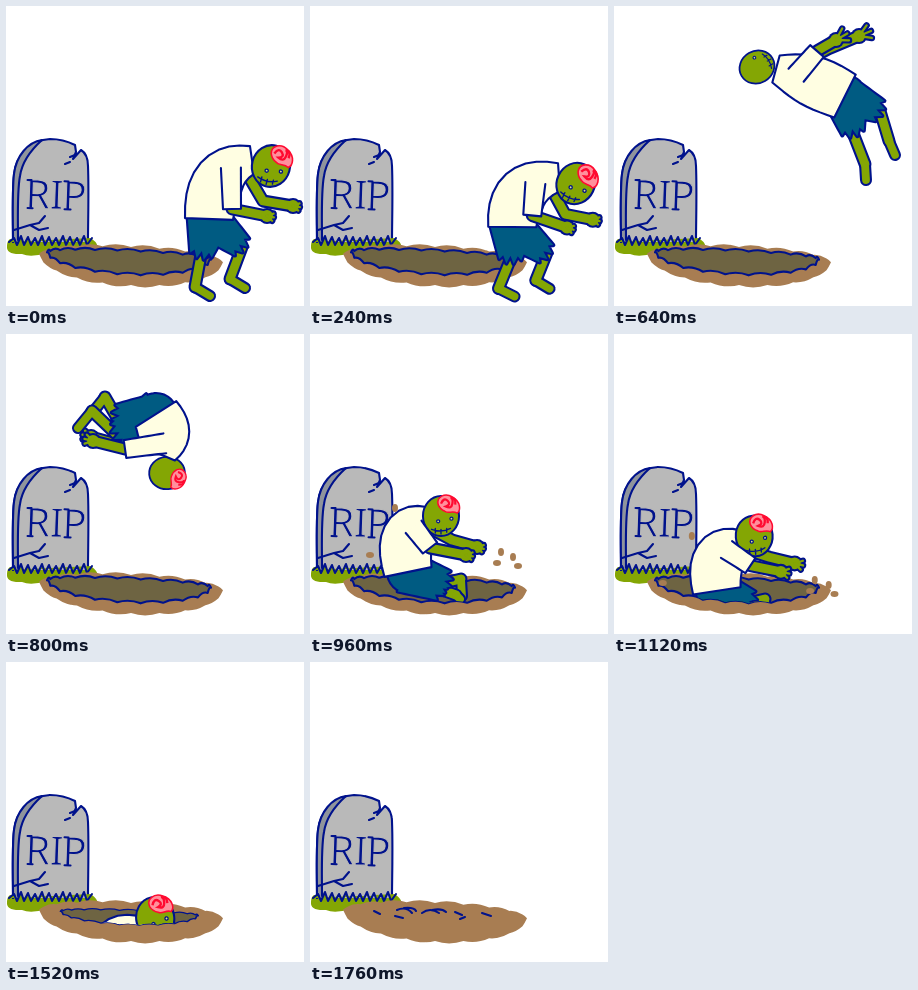
These frames come from a looping animation (298x300 px, 2080 ms). An HTML page:

```html
<!DOCTYPE html>
<html lang="en">
<head>
<meta charset="utf-8">
<title>Back to the grave</title>
<style>
html, body { margin: 0; width: 100%; height: 100%; overflow: hidden; background: #fff; }
svg { display: block; width: 100vw; height: 100vh; }
.ink { stroke: #00128c; stroke-width: 2.1; stroke-linejoin: round; stroke-linecap: round; }
.line { fill: none; }
text { font: 300 40px "Noto Sans", sans-serif; fill: #00128c; stroke: #b9b9b9; stroke-width: 1.1; }
</style>
</head>
<body>
<svg viewBox="0 0 298 300">
  <defs><clipPath id="pit"><path id="pitShape"/></clipPath></defs>
  <path fill="#84a604" d="M4 233L86 233Q93 238 91 243Q84 250 70 246Q55 251 40 247Q25 252 16 248Q0 249 1 240Q1 235 4 233Z"/>
  <path class="ink" fill="#b9b9b9" d="M7 236C7 215 6 185 8 168C10 150 24 134 44 133C55 133 63 136 69 139L70 146 67 153 75 144C80 147 82 152 82 160C83 185 82 215 82 236"/>
  <path class="ink" fill="#8f949c" d="M7 236C7 215 6 185 8 168C10 150 22 136 36 134C26 143 16 156 14 170C11 185 12 210 12 234"/>
  <path class="ink line" d="M64 151l5-2M59 158l5-2M8 224L24 219 33 217 39 210M24 219L33 224 42 222"/>
  <g transform="rotate(2 50 190)">
    <text y="203"><tspan x="19.5">R</tspan><tspan x="44">I</tspan><tspan x="56.5">P</tspan></text>
    <path class="ink line" d="M22 203h5M59 203h6M21 175h4M58 175h4"/>
  </g>
  <path id="grass" class="ink" fill="#84a604"/>
  <path id="mound" fill="#a87d52"/>
  <path id="hole" class="ink" fill="#6e6442"/>
  <path id="marks" class="ink line" d="M64 249l6 3M85 254l8 2M87 248q9-4 15 3M94 246q10-1 12 3M112 251q8-6 17 0M122 248q10-2 14 2M145 250l7 3M150 257l5-2M172 251l9 3"/>
  <g id="zombie"></g>
  <g id="dirt" fill="#a87d52"></g>
</svg>
<script>
const $ = id => document.getElementById(id);
const STEP = 80, LOOP = 2080, LAST = 22;
const INK = '#00128c', SKIN = '#84a604', SHIRT = '#fffee2', CLOTH = '#005b82';

// spine: hip, bend, neck; arms: elbow, hand; legs: hem, ankle, toe;
// face: head radius, tilt, how far the fingers are spread.
const stand = {
  view: 'front', spine: [203, 213, 205, 160, 246, 154], head: [265, 160], face: [20, 15, 0],
  arm: [226, 203, 261, 210], farArm: [257, 195, 287, 200],
  leg: [195, 249, 189, 281, 204, 290], farLeg: [236, 241, 224, 273, 239, 282]
};
const crouch = {
  view: 'front', spine: [200, 245, 196, 218, 258, 223], head: [268, 230], face: [20, 55, 0],
  arm: [211, 229, 245, 256], farArm: [250, 248, 270, 255],
  leg: [216, 268, 187, 287, 206, 292], farLeg: [238, 268, 231, 279, 241, 285]
};
const fly = {
  view: 'side', spine: [231, 90, 195, 72, 162, 63], head: [143, 61], face: [17, -120, 1],
  arm: [203, 45, 222, 34], farArm: [214, 43, 245, 30],
  leg: [239, 127, 251, 158, 252, 174], farLeg: [266, 105, 275, 135, 281, 149]
};
const tuck = {
  view: 'back', spine: [150, 80, 164, 102, 156, 121], head: [161, 139], face: [17, 85, 0.3],
  arm: [119, 115, 87, 107], farArm: [118, 112, 85, 103],
  leg: [110, 100, 86, 77, 72, 94], farLeg: [110, 82, 99, 63, 87, 78]
};
const sit = {
  view: 'front', spine: [98, 238, 88, 190, 118, 187], head: [131, 182], face: [19, 0, 0],
  arm: [120, 214, 156, 221], farArm: [142, 206, 167, 213],
  leg: [132, 256, 146, 261, 150, 265], farLeg: [138, 248, 151, 245, 152, 262]
};
const sink = {
  view: 'front', spine: [110, 285, 108, 246, 144, 246], head: [154, 232], face: [20, -12, 0.7],
  arm: [161, 258, 183, 263], farArm: [176, 249, 201, 254],
  leg: [132, 306, 146, 311, 150, 315], farLeg: [138, 298, 151, 295, 152, 312]
};

const lerp = (a, b, k) => a + (b - a) * k;
const pairs = v => Array.from({ length: v.length / 2 }, (_, i) => [v[2 * i], v[2 * i + 1]]);

function mapPose(pose, fn) {
  return Object.fromEntries(Object.entries(pose).map(([k, v]) => [k, k === 'view' ? v : fn(v, k)]));
}
const mix = (a, b, k) => mapPose(a, (v, key) => v.map((n, i) => lerp(n, b[key][i], k)));

// Turn a pose about its hip, then shift it.
function spin(pose, deg, dx, dy) {
  const a = deg * Math.PI / 180, c = Math.cos(a), s = Math.sin(a), [hx, hy] = pose.spine;
  return mapPose(pose, (v, key) => key === 'face' ? [v[0], v[1] + deg, v[2]] :
    pairs(v).flatMap(([x, y]) => [
      hx + dx + (x - hx) * c - (y - hy) * s,
      hy + dy + (x - hx) * s + (y - hy) * c
    ]));
}

const keys = [
  [0, stand], [2, stand], [6, crouch],
  [7, spin(fly, 45, -3, 12)], [8, fly],
  [9, spin(tuck, 50, 43, 0)], [10, tuck],
  [11, spin(sit, 50, -14, -75)], [12, sit],
  [17, sink], [LAST, spin(sink, 0, -12, 60)]
];

function poseAt(f) {
  const i = Math.max(1, keys.findIndex(k => k[0] >= f));
  const [t0, a] = keys[i - 1], [t1, b] = keys[i];
  return f === t1 ? b : mix(a, b, (f - t0) / (t1 - t0));
}

const along = (a, c, b, t) => [0, 1].map(j => lerp(lerp(a[j], c[j], t), lerp(c[j], b[j], t), t));

// Tapered band along a curve; the far end may be torn into teeth.
function band(a, c, b, r0, r1, bulge = 0, teeth = 0) {
  const left = [], right = [], N = 10;
  let dir;
  for (let i = 0; i <= N; i++) {
    const t = i / N, p = along(a, c, b, t);
    const d = [0, 1].map(j => lerp(c[j] - a[j], b[j] - c[j], t));
    const len = Math.hypot(...d) || 1, r = lerp(r0, r1, t) + bulge * Math.sin(Math.PI * t);
    dir = [d[0] / len, d[1] / len];
    left.push([p[0] + dir[1] * r, p[1] - dir[0] * r]);
    right.unshift([p[0] - dir[1] * r, p[1] + dir[0] * r]);
  }
  const torn = [];
  for (let i = 1; teeth && i < 6; i++) {
    const push = i % 2 ? -teeth : teeth;
    torn.push([0, 1].map(j => lerp(left[N][j], right[0][j], i / 6) + dir[j] * push));
  }
  return 'M' + [...left, ...torn, ...right].join('L');
}
const mid = (a, b) => [(a[0] + b[0]) / 2, (a[1] + b[1]) / 2];
const straight = (a, b, ...rest) => band(a, mid(a, b), b, ...rest);

const shape = (d, fill) => `<path class="ink" fill="${fill}" d="${d}"/>`;
// Several shapes joined under one outline.
const union = (d, fill) => `<path class="ink" d="${d}" style="stroke-width:4.2"/><path fill="${fill}" d="${d}"/>`;

// Limbs are round strokes: all outlines first, then the skin.
function limb(strokes) {
  const pass = (colour, inset) => strokes.map(([pts, w]) =>
    `<path d="M${pts.join('L')}" fill="none" stroke="${colour}" stroke-width="${w - inset}" stroke-linecap="round" stroke-linejoin="round"/>`).join('');
  return pass(INK, 0) + pass(SKIN, 4.2);
}

function arm(from, [elbow, hand], spread) {
  const aim = Math.atan2(hand[1] - elbow[1], hand[0] - elbow[0]);
  const strokes = [[[from, elbow, hand], 13], [[hand, [hand[0] + 0.1, hand[1]]], 16]];
  for (let i = -1; i <= 1; i++) {
    const a = aim + i * 0.55, reach = 7 + 6 * spread;
    strokes.push([[hand, [hand[0] + Math.cos(a) * reach, hand[1] + Math.sin(a) * reach]], 6.5]);
  }
  return limb(strokes);
}

const leg = ([hem, ankle, toe]) => limb([[[hem, ankle], 13], [[ankle, toe], 12]]);

function head([x, y], [r, tilt], view) {
  let out = '<ellipse class="ink" rx="19" ry="21" fill="' + SKIN + '"/>';
  if (view !== 'side') {
    out += '<path fill="#ff909c" stroke="#ff0a30" stroke-width="1.6" d="M-3-12C-5-20 4-25 12-20C21-15 21-6 17-3C12-6 8-2 4-5Q-1-7-3-12Z"/>' +
      '<path fill="none" stroke="#ff0a30" stroke-width="2.4" d="M0-13q3-7 7-3t-2 6q6 3 7-3t-2-6q6-1 5 7"/>';
  }
  if (view !== 'back') {
    const eyes = view === 'side' ? [11] : [-3, 11];
    out += eyes.map(e => `<circle class="ink" cx="${e}" cy="${5 - e / 5}" r="1.6" fill="#dce58a" style="stroke-width:1.3"/>`).join('');
    out += '<path class="ink line" style="stroke-width:1.4" d="M-10 14Q1 18 10 13M-6 13v5M0 14v5M6 13v4"/>';
  }
  return `<g transform="translate(${x} ${y}) rotate(${tilt}) scale(${r / 20})">${out}</g>`;
}

const clipped = (on, s) => on ? `<g clip-path="url(#pit)">${s}</g>` : s;

function zombie(p, inPit, allIn) {
  const [hip, bend, neck] = pairs(p.spine);
  const near = pairs(p.arm), far = pairs(p.farArm), l = pairs(p.leg), fl = pairs(p.farLeg);
  const spread = p.face[2], joint = t => along(hip, bend, neck, t);
  const seat = `M${hip[0] - 20} ${hip[1]}a20 20 0 1 1 40 0a20 20 0 1 1-40 0Z`;
  const shorts = union(seat + straight(hip, fl[0], 20, 11, 0, 4) + 'Z' + straight(hip, l[0], 22, 11, 0, 4) + 'Z', CLOTH);
  const torso = shape(band(hip, bend, neck, 24, 14, 6) + 'Z', SHIRT);
  const face = head(p.head, p.face, p.view);
  const body = leg(fl) + leg(l) + shorts + (p.view === 'back' ? face + torso : torso + face);
  const front = arm(near[0], near, spread) + shape(straight(joint(0.7), near[0], 10, 9), SHIRT);
  return clipped(allIn, arm(joint(0.85), far, spread) + clipped(inPit, body) + front);
}

// Lumpy ring of soil: flat above, deep below; lift bends each lump.
function ring(cx, cy, rx, up, down, n, lift) {
  const at = i => {
    const a = i / n * 2 * Math.PI, x = rx * Math.cos(a), s = Math.sin(a);
    return [cx + x, cy + x * 0.045 + s * (s > 0 ? down : up)];
  };
  let d = 'M' + at(0);
  for (let i = 0; i < n; i++) {
    const [x, y] = mid(at(i), at(i + 1));
    d += `Q${x} ${y + lift(Math.sin((i + 0.5) / n * 2 * Math.PI))} ${at(i + 1)}`;
  }
  return d + 'Z';
}
const hole = ring(123, 250, 82, 5, 19, 22, () => -4);
$('mound').setAttribute('d', ring(125, 252, 92, 11, 27, 20, s => 5 * s));
$('hole').setAttribute('d', hole);
$('pitShape').setAttribute('d', 'M-900-2500H1200V250H-900Z' + hole);

let blades = 'M3 236';
for (let x = 8; x < 84; x += 7) blades += `L${x} ${230 + x % 3}L${x + 3} 239`;
$('grass').setAttribute('d', blades + 'L86 232');

const specks = [[85, 174], [60, 221], [191, 218], [187, 229], [203, 223], [208, 232]];

function draw(f) {
  $('zombie').innerHTML = f < LAST ? zombie(poseAt(f), f >= 12, f > 17) : '';

  const open = Math.max(0.01, Math.min(1, (LAST - f) / 5));
  const shrink = `translate(125 254) scale(${0.6 + 0.4 * open} ${open}) translate(-125 -254)`;
  $('hole').setAttribute('transform', shrink);
  $('pitShape').setAttribute('transform', shrink);
  $('hole').style.display = f < LAST ? '' : 'none';
  $('marks').style.display = f < LAST ? 'none' : '';

  const age = f - 12;
  $('dirt').innerHTML = age < 0 || age > 2 ? '' : specks.map(([x, y], i) =>
    `<ellipse cx="${x + (x - 130) * 0.08 * age}" cy="${y + 7 * age * age}" rx="${3 + i % 2}" ry="${4 - i % 2}"/>`).join('');
}

let shown = -1;
function tick(now) {
  const t = now % LOOP;
  const f = t < 240 ? 0 : Math.min(LAST, Math.floor(t / STEP));
  if (f !== shown) draw(shown = f);
  requestAnimationFrame(tick);
}
draw(0);
requestAnimationFrame(tick);
</script>
</body>
</html>
```
